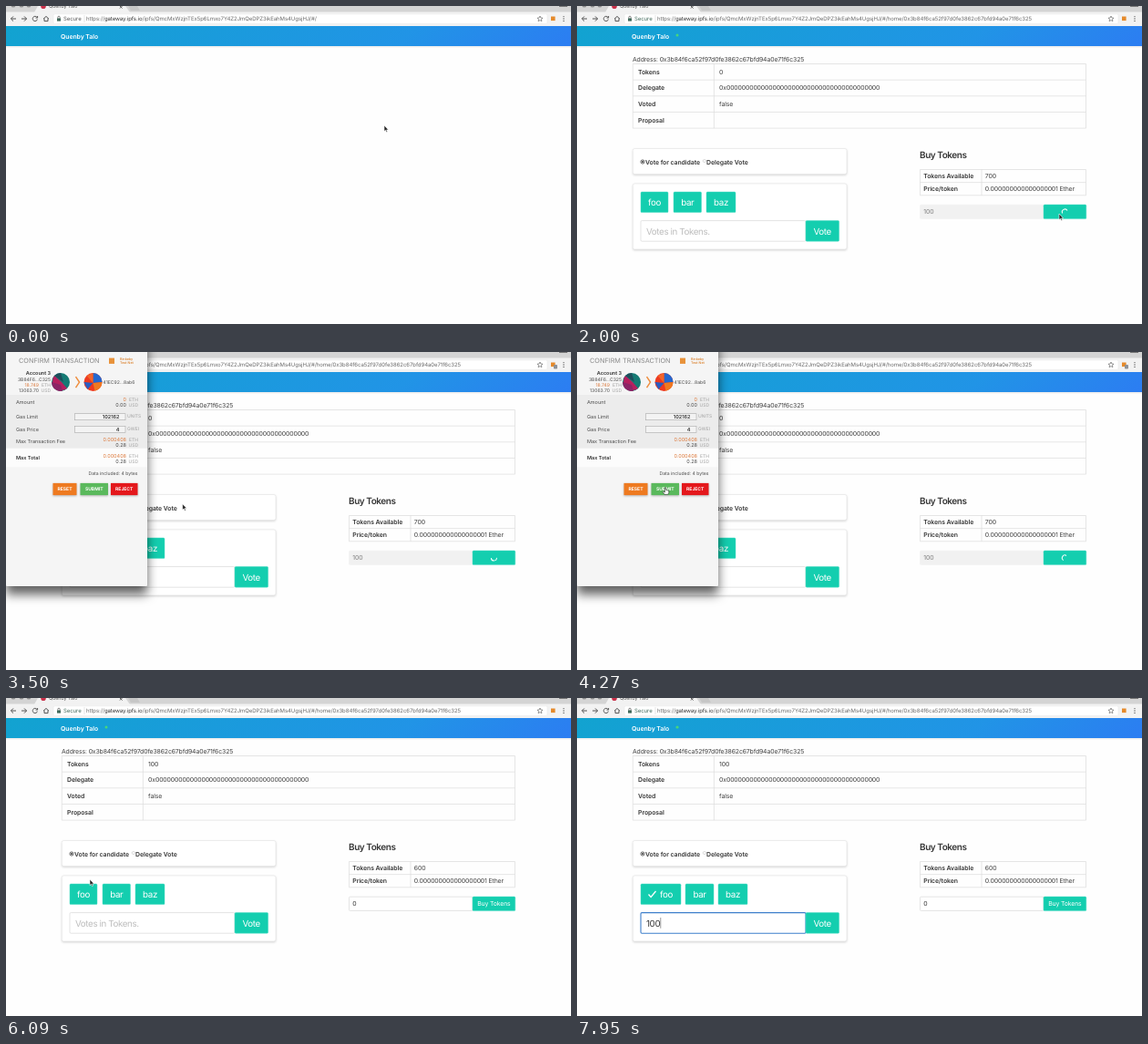
These frames come from a looping animation (620x349 px, 8 s). An HTML page:

```html
<!DOCTYPE html>
<html lang="en">
<head>
<meta charset="utf-8">
<title>Token voting</title>
<style>
  html, body { margin: 0; width: 100%; height: 100%; overflow: hidden; background: #fefefe; }
  svg { display: block; width: 100vw; height: 100vh; }
  text { font: 400 6.9px Inter, sans-serif; letter-spacing: -.02em; fill: #404040; white-space: pre; text-rendering: geometricPrecision; }
  .b { font-weight: 600; letter-spacing: -.01em; fill: #363636; }
  .url { font-size: 6px; letter-spacing: -.01em; fill: #686868; }
  .tab { font-size: 5.3px; letter-spacing: 0; fill: #555; }
  .title { font-size: 10px; font-weight: 600; letter-spacing: -.045em; fill: #363636; }
  .big { font-size: 9.8px; letter-spacing: -.04em; }
  .white { fill: #fff; }
  .end { text-anchor: end; }
  .mid { text-anchor: middle; }
  .wallet text { letter-spacing: 0; font-size: 5.5px; fill: #4c4c4c; }
  .wallet .small { font-size: 5.1px; }
  .wallet .unit { font-size: 5px; fill: #a2a2a2; }
  .wallet .orange { fill: #dd7a3c; }
  .wallet .tiny { font-size: 3.7px; font-weight: 600; fill: #dd8a3c; }
  .wallet .head { font-size: 7.3px; fill: #8a8a8a; }
  .wallet .act { font-size: 5px; font-weight: 700; fill: #fff; }
  .wallet .strong { font-weight: 600; fill: #333; }
  .line { fill: none; stroke: #dbdbdb; stroke-width: .7; }
  .icon { fill: none; stroke: #555; stroke-width: 1; }
  .card { fill: #fff; stroke: #e2e2e2; stroke-width: .6; filter: drop-shadow(0 1px .8px rgba(0,0,0,.16)); }
  .sheet { fill: #f5f5f5; filter: drop-shadow(0 9px 6px rgba(0,0,0,.62)); }
</style>
</head>
<body>
<svg id="stage" viewBox="0 0 620 349" preserveAspectRatio="none"></svg>
<script>
const LOOP = 8000;
const TIME = {
  load: 860, buyFocus: 1140, buyType: 1300, buy: 1980, popup: 2200, details: 2950,
  popupEnd: 4970, bought: 5850, pick: 6400, voteFocus: 7050, voteType: 7480
};
const APP = 'Quenby Talo';
const ACCOUNT = '0x3b84f6ca52f97d0fe3862c67bfd94a0e71f6c325';
const GREEN = '#14ceaf';

const text = (x, y, s, cls = '', id = '') => `<text x="${x}" y="${y}" class="${cls}" id="${id}">${s}</text>`;
const rect = (x, y, w, h, fill, more = '') => `<rect x="${x}" y="${y}" width="${w}" height="${h}" fill="${fill}" ${more}/>`;
const path = (d, cls = 'line', more = '') => `<path d="${d}" class="${cls}" ${more}/>`;
const dot = (x, y, r, fill, more = '') => `<circle cx="${x}" cy="${y}" r="${r}" fill="${fill}" ${more}/>`;
const group = (id, body, more = '') => `<g id="${id}" ${more}>${body}</g>`;

function table(x, y, width, split, rowHeight, rows, pad) {
  let out = path(`M${x} ${y}h${width}v${rowHeight * rows.length}h${-width}zM${split} ${y}v${rowHeight * rows.length}`);
  rows.forEach(([label, value, id], i) => {
    const top = y + i * rowHeight, base = top + rowHeight / 2 + 2.5;
    if (i) out += path(`M${x} ${top}h${width}`);
    out += text(x + pad, base, label, 'b') + text(split + pad, base, value, '', id);
  });
  return out;
}

const greenBox = (x, y, w, h) => rect(x, y, w, h, GREEN, 'rx="1.2" stroke="#4fdcc4" stroke-width=".5"');
const button = (x, w, label) => greenBox(x, 204, w, 22.6) + text(x + w / 2, 218.9, label, 'big white mid');

const chrome = `
  ${rect(0, 0, 620, 8, '#d4d4d4')}
  ${path('M31 7L35 0H131L136 7z', '', 'fill="#f2f2f2"')}
  ${path('M134 0h10l3 5h-10z', '', 'fill="#c6c6c6"')}
  ${rect(0, 6.5, 620, 15.5, '#f2f2f2')}
  ${[8, 17, 25].map(x => dot(x, -1, 2.5, '#8d8d8d')).join('')}
  ${dot(41, .3, 2.8, '#c9304a')}${text(47, 2, APP, 'tab')}
  ${path('M125 0l2.5 2.5m0-2.5l-2.5 2.5', 'icon')}
  ${rect(607, 0, 9, 1, '#777')}
  ${rect(52, 8.8, 542, 10.6, '#fff', 'rx="1.5" stroke="#e4e4e4" stroke-width=".5"')}
  ${path('M11 14H5.5M8 11.4L5.4 14L8 16.6M17 14h5.5M20 11.4L22.6 14L20 16.6', 'icon')}
  ${path('M33.8 12.2A2.6 2.6 0 1 0 34.4 14.6M34.6 11v2h-2', 'icon')}
  ${path('M41 14.2L44 11.4L47 14.2M42 13.6v3h4v-3', 'icon')}
  ${rect(56, 13.4, 4, 3.2, '#40695a')}${path('M56.8 13.4v-1a1.2 1.2 0 0 1 2.4 0v1', 'icon', 'style="stroke-width:.7"')}
  ${text(63, 16.2, 'Secure', 'url', 'secure')}${path('M86 10v8')}
  <text x="88" y="16.2" class="url">https://<tspan fill="#303030">gateway.ipfs.io</tspan>/ipfs/QmcMxWzjnTEx5p6Lmxo7Y4Z2JmQeDPZ3ikEahMs4UgsjHJ/#/<tspan id="route"></tspan></text>
  ${path('M586 11l.9 2 2.1.2-1.6 1.4.5 2.1-1.9-1.1-1.9 1.1.5-2.1-1.6-1.4 2.1-.2z', 'icon', 'style="stroke-width:.6"')}
  ${rect(598, 11.5, 4.6, 4.6, '#e58a2b')}${group('badge', rect(601, 14, 4, 4.5, '#8d9299', 'rx=".8"'))}
  ${[11.6, 14, 16.4].map(y => dot(612, y, .7, '#555')).join('')}
  ${rect(0, 44, 620, 1.5, '#eeeeee')}${rect(0, 22, 620, 22, 'url(#hero)')}
  ${text(60, 35.8, APP, 'b white')}`;

const page = `
  ${dot(110, 32, 2, '#48d67a', 'id="pulse"')}
  ${text(61, 60.8, 'Address: ' + ACCOUNT)}
  ${table(61.3, 63.5, 497.2, 150.4, 17.65, [
    ['Tokens', '0', 'tokens'], ['Delegate', '0x' + '0'.repeat(40)], ['Voted', 'false'], ['Proposal', '']
  ], 5.7)}
  ${rect(61.3, 156.5, 234.7, 28, '#fff', 'rx="2" class="card"')}
  ${dot(72, 171, 2.1, '#fff', 'stroke="#444" stroke-width=".8"')}${dot(72, 171, 1, '#333')}
  ${text(75, 173.6, 'Vote for candidate', 'b')}
  ${dot(139.8, 170, 1.6, '#fff', 'stroke="#bbb" stroke-width=".5"')}${text(142, 173.6, 'Delegate Vote', 'b')}
  ${rect(61.3, 195, 234.7, 72, '#fff', 'rx="2" class="card"')}
  ${group('plain', button(70, 30, 'foo') + button(106, 30.5, 'bar') + button(142, 32, 'baz'))}
  ${group('picked', greenBox(70, 204, 44, 22.6) + text(91, 218.9, 'foo', 'big white')
    + path('M78.5 215.5l2.6 3 5.4-6.5', 'icon', 'style="stroke:#fff;stroke-width:1.3"')
    + button(119, 31, 'bar') + button(155, 32, 'baz'))}
  ${rect(70, 235.6, 181, 22.6, '#fff', 'id="voteBox" rx="1.2"')}${text(76, 250.9, '', 'big', 'voteText')}
  ${greenBox(251, 235.6, 36.6, 22.6)}${text(269.2, 250.9, 'Vote', 'big white mid')}
  ${path('', 'icon', 'id="voteCaret" style="stroke-width:.6"')}
  ${text(376, 166.9, 'Buy Tokens', 'title')}
  ${table(376.5, 179.5, 182, 444, 14.15, [
    ['Tokens Available', '700', 'available'], ['Price/token', '0.' + '0'.repeat(17) + '1 Ether']
  ], 3.8)}
  ${rect(376.5, 218.2, 135.5, 15.2, '#fff', 'id="buyBox" rx="1"')}${text(380.3, 228.4, '', '', 'buyText')}
  ${path('', 'icon', 'id="buyCaret" style="stroke-width:.6"')}
  ${greenBox(512, 218, 46.8, 15.6)}${text(535.4, 228.4, 'Buy Tokens', 'white mid', 'buyLabel')}
  ${path('M0 -3A3 3 0 0 1 0 3', 'icon', 'id="spinner" style="stroke:#fff;stroke-width:1"')}`;

const amount = (y, ether, dollars) =>
  text(132, y, ether, 'end orange') + text(145, y, 'ETH', 'end unit') +
  text(132, y + 6, dollars, 'end') + text(145, y + 6, 'USD', 'end unit');
const gasField = (y, value, unit) =>
  rect(75.5, y - 4.7, 55.5, 7, '#f3f3f3', 'stroke="#aaa" stroke-width=".6"') +
  text(124.5, y + 1, value, 'end strong') + text(133, y, unit, 'unit');
const walletButton = (x, w, label, fill) =>
  rect(x, 143.3, w, 13.2, fill, 'style="filter:drop-shadow(0 1px 1px #0004)"') + text(x + w / 2, 151.8, label, 'act mid');
const identicon = (x, base, wedges) => dot(x, 32.4, 10, base) +
  wedges.map(([d, fill]) => path(d, '', `fill="${fill}" transform="translate(${x} 32.4)"`)).join('');

const details = `
  ${text(14, 11.4, 'CONFIRM TRANSACTION', 'head')}
  ${rect(113, 6, 6, 6.3, '#e8923a')}${text(125, 8.6, 'Rinkeby', 'tiny')}${text(125, 12.6, 'Test Net', 'tiny')}
  ${text(49, 24.5, 'Account 3', 'strong end')}${text(49, 31.3, '3B84F6...C325', 'small end')}
  ${text(36, 37.4, '18.749', 'small end orange')}${text(49, 37.4, 'ETH', 'end unit')}
  ${text(36, 43.4, '13063.70', 'small end')}${text(49, 43.4, 'USD', 'end unit')}
  ${identicon(60, '#157a74', [
    ['M-7 -7L1 0L7 7A10 10 0 0 1 -7 -7z', '#b5205f'],
    ['M-10 0L0 3L2 9.8A10 10 0 0 1 -10 0z', '#8b2466'], ['M-7 -7A10 10 0 0 1 0 -10L3 0z', '#1d4f5c']])}
  ${identicon(95.5, '#ee3a20', [
    ['M0 -10A10 10 0 0 1 10 0L0 1z', '#2467ce'],
    ['M10 0A10 10 0 0 1 2 9.8L0 1z', '#ee7920'], ['M-10 0L0 1L-6 8z', '#2a5cc0'], ['M-7 -7L0 -10V1z', '#f2652a']])}
  ${path('M76.5 26.5l4 6-4 6', 'icon', 'style="stroke:#ee8e3e;stroke-width:1.5"')}
  ${text(106.5, 34.2, '41EC92...8ab6', 'small')}
  ${rect(0, 46.4, 155, 58.8, '#ececec')}${rect(0, 105.2, 155, 20.5, '#fcfcfc')}
  ${text(11, 56.2, 'Amount')}${amount(53.9, '0', '0.00')}
  ${text(11, 72.2, 'Gas Limit')}${gasField(71.8, '102162', 'UNITS')}
  ${text(11, 86, 'Gas Price')}${gasField(85.4, '4', 'GWEI')}
  ${text(11, 99.4, 'Max Transaction Fee')}${amount(97.2, '0.000408', '0.28')}
  ${text(11, 117, 'Max Total', 'strong')}${amount(115, '0.000408', '0.28')}
  ${text(144.5, 134.2, 'Data included: 4 bytes', 'end small')}
  ${walletButton(51.5, 26, 'RESET', '#ee7a20')}${walletButton(81.5, 30.5, 'SUBMIT', '#5ab95c')}${walletButton(115, 29.5, 'REJECT', '#e4181c')}`;

const outline = 'stroke="#fff" stroke-width=".6"';
const pointer = {
  arrow: path('M0 0V6.6L1.5 5.3L2.5 7.6L3.6 7.1L2.6 4.9H4.6z', '', 'fill="#222" ' + outline),
  beam: path('M-1.5 -1H-.4L0 -.6L.4 -1H1.5M0 -.6V6.6M-1.5 7H-.4L0 6.6L.4 7H1.5', 'icon', 'style="stroke:#333;stroke-width:.7"'),
  hand: path('M-.7 0Q0 -.8.7 0V2.4L3.8 3.2V5.4L2.8 7.4H-1L-3 4.4L-2.3 3.7L-.7 5z', '', 'fill="#fff" stroke="#222" stroke-width=".6"')
};

const $ = id => document.getElementById(id);
$('stage').innerHTML = `
  <defs><linearGradient id="hero" gradientUnits="userSpaceOnUse" x1="182" y1="-125" x2="438" y2="191">
    <stop offset="0" stop-color="#12a3d0"/><stop offset=".7" stop-color="#2194e6"/><stop offset="1" stop-color="#2c7df2"/>
  </linearGradient></defs>
  ${rect(0, 0, 620, 349, '#fefefe')}${chrome}${group('page', page)}
  ${group('popup', rect(0, -20, 155, 277, '', 'class="sheet" rx="1"') +
    group('details', details, 'transform="translate(0 .6)"'), 'class="wallet"')}
  ${group('cursor', Object.entries(pointer).map(([id, shape]) => group(id, shape)).join(''))}`;

const show = (id, on) => { $(id).style.display = on ? '' : 'none'; };
const set = (id, attrs) => { for (const k in attrs) $(id).setAttribute(k, attrs[k]); };
const typed = (t, start) => '100'.slice(0, Math.max(0, Math.floor((t - start) / 110) + 1));

// Pointer stops: time, x, y
const stops = [
  [0, 415, 131], [860, 415, 131], [1120, 389, 220], [1700, 389, 220], [1930, 529, 228],
  [3050, 529, 228], [3700, 97, 149], [5250, 97, 149], [6090, 92, 199], [6280, 86, 214],
  [6600, 86, 214], [7000, 120, 243], [LOOP, 120, 243]
];
function pointerAt(t) {
  const i = stops.findIndex(s => s[0] > t);
  const [t0, x0, y0] = stops[i - 1], [t1, x1, y1] = stops[i];
  const p = (t - t0) / (t1 - t0), e = p * p * (3 - 2 * p);
  return [x0 + (x1 - x0) * e, y0 + (y1 - y0) * e];
}
const inside = (x, y, [l, top, r, bottom]) => x > l && x < r && y > top && y < bottom;

function field(name, value, hint, focused, disabled) {
  const box = $(name + 'Box'), label = $(name + 'Text');
  label.textContent = value || hint;
  label.style.fill = value ? (disabled ? '#7f7f7f' : '#363636') : '#bdbdbd';
  set(name + 'Box', {
    fill: disabled ? '#f1f1f1' : '#fff',
    stroke: disabled ? '#f1f1f1' : focused ? '#3e7fcb' : '#d8d8d8',
    'stroke-width': focused ? 1.1 : .7
  });
  show(name + 'Caret', focused);
  const left = +label.getAttribute('x') + (value ? label.getComputedTextLength() + .6 : 0);
  const top = +box.getAttribute('y'), height = +box.getAttribute('height');
  set(name + 'Caret', { d: `M${left} ${top + height * .24}V${top + height * .76}` });
}

function render(t) {
  const loaded = t >= TIME.load, bought = t >= TIME.bought;
  const waiting = t >= TIME.buy && !bought;
  const popup = t >= TIME.popup && t < TIME.popupEnd;
  show('page', loaded);
  $('route').textContent = loaded ? 'home/' + ACCOUNT : '';
  $('secure').style.fill = loaded ? '#40695a' : '#555';
  show('badge', popup);
  show('popup', popup);
  show('details', t >= TIME.details);

  $('tokens').textContent = bought ? '100' : '0';
  $('available').textContent = bought ? '600' : '700';
  show('plain', t < TIME.pick);
  show('picked', t >= TIME.pick);
  show('buyLabel', !waiting);
  show('spinner', waiting);
  set('spinner', { transform: `translate(535.4 226) rotate(${t / 328 * 360 - 155})` });
  set('pulse', { r: 1.5 + .9 * Math.max(0, Math.cos((t - 1180) / 1400 * 2 * Math.PI)) ** 3 });

  field('buy', bought ? '0' : typed(t, TIME.buyType), 'Number of tokens to buy.', t >= TIME.buyFocus && t < TIME.buy, waiting);
  field('vote', typed(t, TIME.voteType), 'Votes in Tokens.', t >= TIME.voteFocus, false);

  const [x, y] = pointerAt(t);
  const overField = loaded && !waiting && inside(x, y, [376, 218, 512, 234]) || !popup && inside(x, y, [70, 236, 251, 258]);
  const overButton = popup ? t >= TIME.details && inside(x, y, [81, 143, 112, 157])
    : bought && inside(x, y, [70, 204, 100, 227]) || loaded && !waiting && inside(x, y, [512, 218, 559, 234]);
  const kind = overField ? 'beam' : overButton ? 'hand' : 'arrow';
  for (const id in pointer) show(id, id === kind);
  const typing = t >= TIME.buyType && t < 1700 || t >= TIME.voteType;
  show('cursor', !typing);
  set('cursor', { transform: `translate(${x} ${y})` });
}

const start = performance.now();
function tick() {
  render((performance.now() - start) % LOOP);
  requestAnimationFrame(tick);
}
tick();
</script>
</body>
</html>
```
